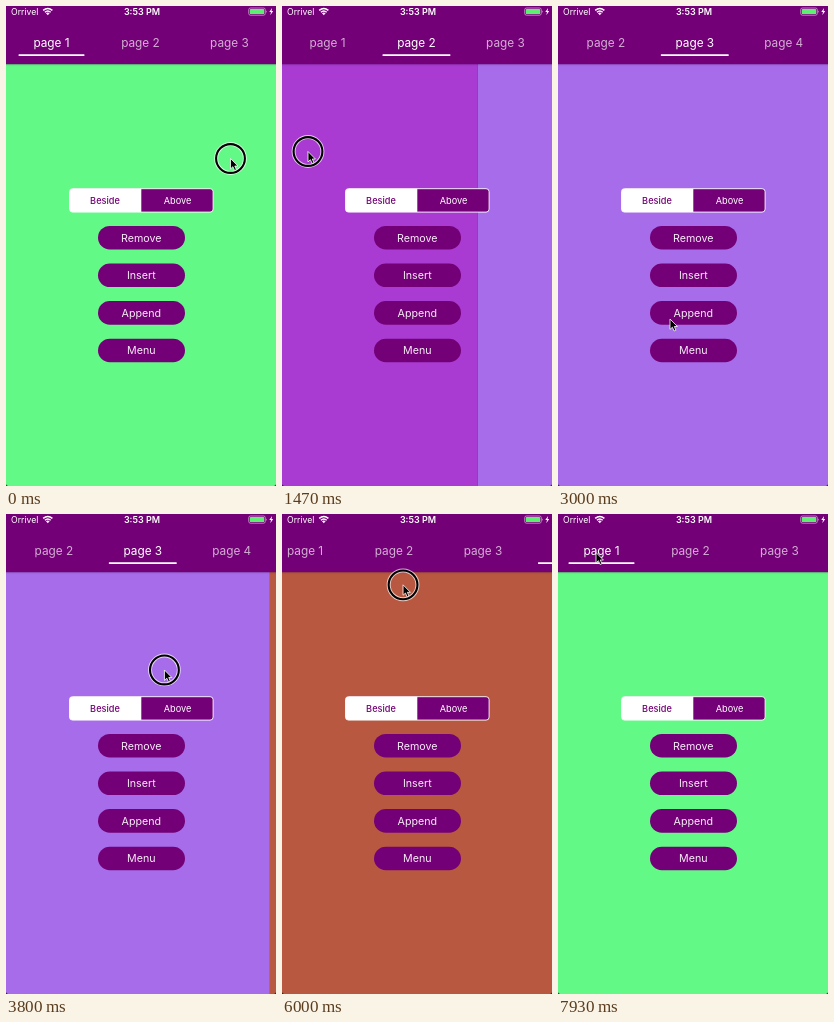
Recreate the animation shown at these times as an HTML page. Size 270 px wide and 480 px high, loop 8000 ms.

```html
<!DOCTYPE html>
<html lang="en">
<head>
<meta charset="utf-8">
<title>Paged tabs</title>
<style>
  html, body { margin: 0; width: 100%; height: 100%; overflow: hidden; background: #111; }
  svg { display: block; width: 100%; height: 100%; font-family: Inter, Roboto, sans-serif; }
  .purple { fill: #740077; }
  .header { filter: drop-shadow(0 .5px 1px rgba(0, 0, 0, .3)); }
  .tab { font-size: 11.8px; fill: #fff; }
  .button { font-size: 10.7px; fill: #f6ebf6; }
</style>
</head>
<body>
<svg viewBox="0 0 270 480">
  <clipPath id="screen"><path d="M0 0H270V477.5Q270 480 267.5 480H2.5Q0 480 0 477.5Z"/></clipPath>
  <g clip-path="url(#screen)">
    <rect id="current" width="270" height="480"/>
    <rect id="next" width="270" height="480"/>
    <rect class="purple header" x="-9" y="-9" width="288" height="67.2"/>

    <g id="status" fill="#fff">
      <text x="5" y="8.6" font-size="8.7">Orrivel</text>
      <path d="M37.2 4.4Q41.8 .4 46.4 4.4M38.9 6.2Q41.8 3.6 44.7 6.2" fill="none" stroke="#fff" stroke-width="1.4"/>
      <path d="M41.8 9.2L40 7.3Q41.8 5.9 43.6 7.3Z"/>
      <text x="136" y="8.6" font-size="9" font-weight="600" text-anchor="middle">3:53 PM</text>
      <rect x="242.7" y="2" width="16.6" height="7.2" rx="1.8" fill="none" stroke="#d9b3d9" stroke-width=".7"/>
      <rect x="243.8" y="3.1" width="14.4" height="5" rx=".9" fill="#5fee74"/>
      <path d="M260.2 4.4Q261.6 5.6 260.2 6.8Z" fill="#d9b3d9"/>
      <path d="M266.1 2L263.3 6H265L264.3 9.2 267.2 5H265.5Z"/>
    </g>

    <g id="tabs" text-anchor="middle">
      <rect id="underline" y="48.2" height="1.7" rx=".6" fill="#fff"/>
    </g>

    <g id="controls" text-anchor="middle" fill="#fff">
      <rect class="purple" x="63.5" y="182.7" width="143.6" height="23.4" rx="3" stroke="#fff" stroke-width=".9"/>
      <path d="M135.3 182.7H66.5Q63.5 182.7 63.5 185.7V203.1Q63.5 206.1 66.5 206.1H135.3Z"/>
      <g font-size="9.2">
        <text class="purple" x="99" y="197.8" font-weight="500">Beside</text>
        <text x="171.5" y="197.8">Above</text>
      </g>
    </g>

    <g id="pointer">
      <g id="ring" fill="none">
        <circle r="14.4" stroke="#fff" stroke-opacity=".7" stroke-width="4"/>
        <circle r="14.4" stroke="#000" stroke-width="2.1"/>
      </g>
      <path d="M0 0V10.4L2.4 8.2 4.1 12 5.9 11.2 4.3 7.5H7.4Z" stroke="#fff" stroke-width=".8"/>
    </g>
  </g>
</svg>
<script>
const LOOP = 8000, WIDTH = 270, SLIDE = 380;
const APPEND = 2950, TAB_DRAG = 5870;
const SCROLL_END = 86.6, SCROLL_REST = 2;
const colors = ['#63f987', '#a93bd3', '#a76cea', '#b95840'];

const el = id => document.getElementById(id);
const tabCenter = i => 45.5 + 88.95 * i;

function add(parent, name, attrs, text = '') {
  const node = document.createElementNS('http://www.w3.org/2000/svg', name);
  set(node, attrs);
  node.textContent = text;
  return el(parent).appendChild(node);
}
function set(node, attrs) {
  for (const key in attrs) node.setAttribute(key, attrs[key]);
}

['Remove', 'Insert', 'Append', 'Menu'].forEach((label, i) => {
  const y = 231.7 + 37.6 * i;
  add('controls', 'rect', { class: 'purple', x: 92, y: y - 11.8, width: 87, height: 23.6, rx: 11.8 });
  add('controls', 'text', { class: 'button', x: 135.3, y: y + 3.9 }, label);
});
const tabs = colors.map((_, i) =>
  add('tabs', 'text', { class: 'tab', x: tabCenter(i), y: 41 }, `page ${i + 1}`));

const mix = (a, b, k) => a + (b - a) * k;
const progress = (t, at, duration) => Math.max(0, Math.min(1, (t - at) / duration));
const smooth = k => k * k * (3 - 2 * k);
const easeOut = k => 1 - (1 - k) ** 3;
const overshoot = k => 1 + 4 * (k - 1) ** 3 + 3 * (k - 1) ** 2;

const glides = [], presses = [], slides = [];
const glide = (at, duration, x, y) => glides.push({ at, duration, x, y });
const press = (at, duration) => presses.push({ at, duration });
const slide = (at, from, to, select) => slides.push({ at, from, to, select });

function swipe(at, from) {
  press(at - 150, 320);
  glide(at - 25, 155, 26, 145.5);
  slide(at, from, from + 1, at + SLIDE + 20);
}

// The whole session, in order.
glide(-1, 1, 224.5, 152.5);
swipe(140, 0);
glide(500, 500, 222, 152);
swipe(1340, 1);
glide(1600, 600, 73, 252);
glide(2350, 350, 112, 313);
press(2780, 150);
glide(3000, 600, 222, 161);
swipe(3767, 2);
glide(3960, 370, 75, 292);
glide(4540, 730, 50.5, 41);
press(5470, 680);
glide(TAB_DRAG, 260, 190, 100);
glide(6130, 370, 207, 211);
glide(6650, 350, 35, 36);
glide(7010, 120, 38, 38.5);
press(7270, 130);
slide(7430, 3, 0, 7430);

function draw(t) {
  let page = 0, target = 0, travel = 0;
  let selected = 0, line = tabCenter(0);
  for (const { at, from, to, select } of slides) {
    if (t >= at) {
      [page, target] = [from, to];
      travel = WIDTH * smooth(progress(t, at, SLIDE));
    }
    if (t >= select) {
      selected = to;
      line = mix(tabCenter(from), tabCenter(to), easeOut(progress(t, select, 180)));
    }
  }
  const direction = target < page ? -1 : 1;
  set(el('current'), { fill: colors[page], x: -direction * travel });
  set(el('next'), { fill: colors[target], x: direction * (WIDTH - travel) });

  const scroll = t < APPEND ? 0
    : mix(SCROLL_END, SCROLL_REST, overshoot(progress(t, TAB_DRAG, 800)));
  set(el('tabs'), { transform: `translate(${-scroll})` });
  tabs.forEach((tab, i) => set(tab, {
    'fill-opacity': i === selected ? 1 : .68,
    visibility: i === 3 && t < APPEND ? 'hidden' : 'visible'
  }));
  const lineWidth = selected ? 68 : 66;
  set(el('underline'), { x: line - lineWidth / 2, width: lineWidth });

  let x = 0, y = 0;
  for (const g of glides) {
    const k = smooth(progress(t, g.at, g.duration));
    x = mix(x, g.x, k);
    y = mix(y, g.y, k);
  }
  set(el('pointer'), { transform: `translate(${x} ${y})` });
  const pressed = presses.some(p => t >= p.at && t < p.at + p.duration);
  set(el('ring'), { visibility: pressed ? 'visible' : 'hidden' });
}

const start = performance.now();
function frame() {
  draw((performance.now() - start) % LOOP);
  requestAnimationFrame(frame);
}
frame();
</script>
</body>
</html>
```
